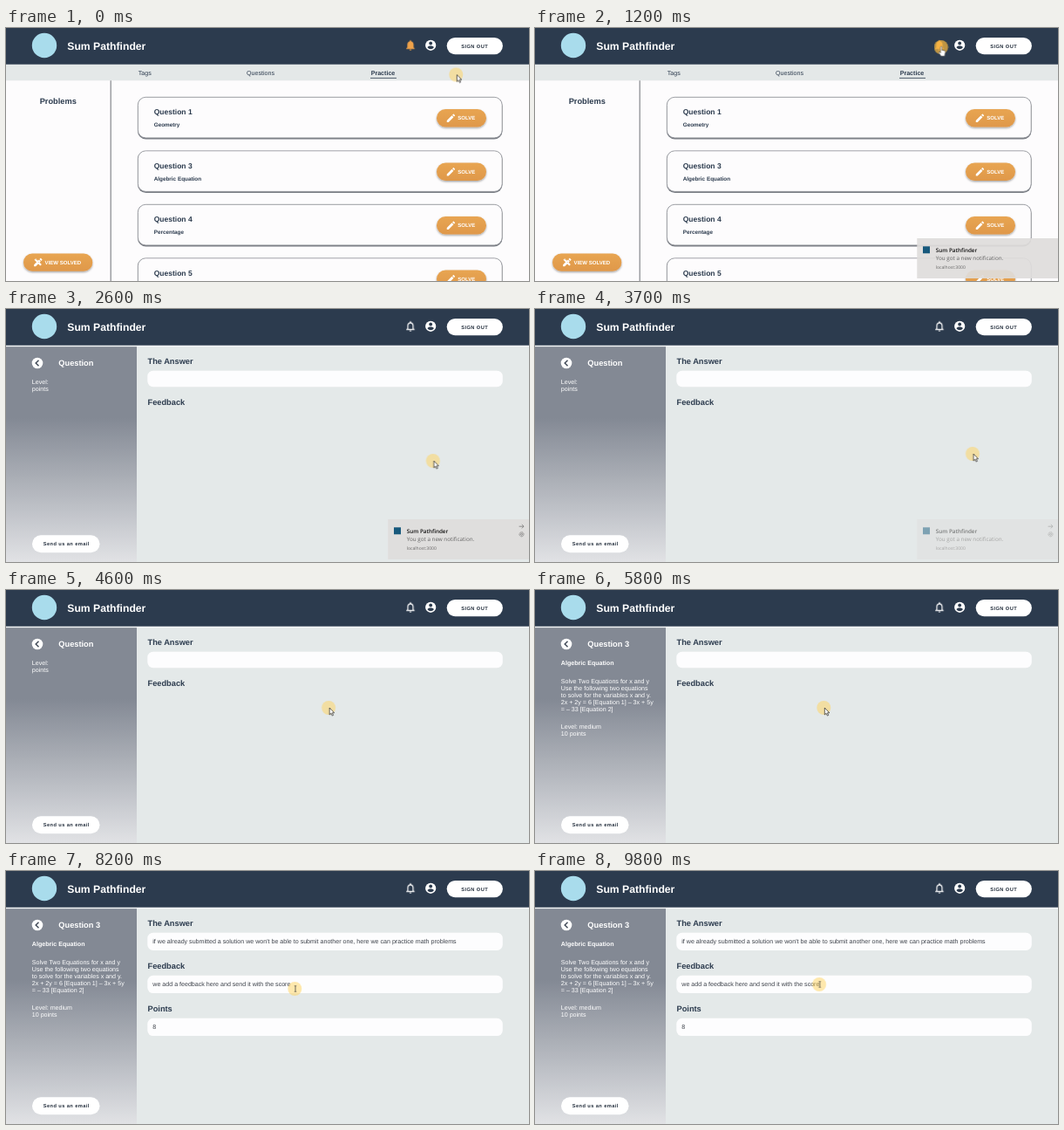
An HTML page that plays this animation: 600 px wide and 290 px high, repeating every 9900 ms.

```html
<!DOCTYPE html>
<html lang="en">
<head>
<meta charset="utf-8">
<title>Practice notifications</title>
<style>
  html, body { margin: 0; width: 100%; height: 100%; overflow: hidden; background: #fdfcfd; }
  svg { display: block; width: 600px; height: 290px; }
  text { font: 7.1px "Liberation Sans", Arial, sans-serif; fill: #2c3b4e; text-rendering: geometricPrecision; }
  .bold { font-weight: 700; }
  .brand { font-size: 12.2px; font-weight: 700; fill: #fff; }
  .heading { font-size: 9.25px; font-weight: 700; }
  .title { font-size: 8.5px; font-weight: 700; }
  .topic { font-size: 6.36px; font-weight: 700; }
  .label { font-size: 6.05px; font-weight: 700; fill: #fff; }
  .pill { font-size: 5.7px; font-weight: 700; letter-spacing: .41px; fill: #26313f; }
  .light text { fill: #fff; }
  .field text { fill: #3c4149; }
  .field rect { fill: #fdfdfe; }
  #toast text { font-family: "Open Sans", "Noto Sans", sans-serif; font-size: 6.3px; fill: #666; }
  #toast .app { font-weight: 600; fill: #111; }
  #toast .host { font-size: 5.05px; }

  /* One loop is 9.9 s, so 1% is 99 ms. */
  .t { animation: 9.9s step-end infinite; }
  .list { animation-name: list; }
  .detail { animation-name: detail; }
  .popup { animation-name: popup; }
  .tools { animation-name: tools; }
  .loading { animation-name: loading; }
  .loaded { animation-name: loaded; }
  .empty { animation-name: empty; }
  .answered { animation-name: answered; }
  .arrow { animation-name: arrow; }
  .hand { animation-name: hand; }
  .beam { animation-name: beam; }
  .press { animation-name: press; }
  @keyframes list { 0% { opacity: 1 } 26.26%, 100% { opacity: 0 } }
  @keyframes detail { 0% { opacity: 0 } 26.26%, 100% { opacity: 1 } }
  @keyframes popup { 0% { opacity: 0 } 14.14% { opacity: 1 } 26.26%, 100% { opacity: 0 } }
  @keyframes tools { 0% { opacity: 0 } 16.16%, 100% { opacity: 1 } }
  @keyframes loading { 0% { opacity: 1 } 58.58%, 100% { opacity: 0 } }
  @keyframes loaded { 0% { opacity: 0 } 58.58%, 100% { opacity: 1 } }
  @keyframes empty { 0% { opacity: 1 } 78.78%, 100% { opacity: 0 } }
  @keyframes answered { 0% { opacity: 0 } 78.78%, 100% { opacity: 1 } }
  @keyframes arrow { 0% { opacity: 1 } 7.07% { opacity: 0 } 17.17% { opacity: 1 } 78.78%, 100% { opacity: 0 } }
  @keyframes hand { 0% { opacity: 0 } 7.07% { opacity: 1 } 17.17%, 100% { opacity: 0 } }
  @keyframes beam { 0% { opacity: 0 } 78.78%, 100% { opacity: 1 } }
  @keyframes press { 0% { opacity: 0 } 12.12% { opacity: 1 } 14.14% { opacity: 0 } 24.24% { opacity: 1 } 26.26%, 100% { opacity: 0 } }

  #toast { animation: toast 9.9s linear infinite; }
  @keyframes toast {
    0%, 1% { transform: translateX(165px); opacity: 1; animation-timing-function: ease-out; }
    7% { transform: none; opacity: 1; }
    34.34% { transform: none; opacity: 1; }
    40.4%, 100% { transform: none; opacity: 0; }
  }
  #pointer { animation: pointer 9.9s ease-in-out infinite; }
  @keyframes pointer {
    0%, 1.01% { transform: translate(517px, 53.5px) }
    8.08%, 15.15% { transform: translate(466.5px, 22px) }
    23.2%, 26.25% { transform: translate(484px, 63px); animation-timing-function: step-end; }
    26.26% { transform: translate(490.5px, 174px); animation-timing-function: ease-out; }
    30.3%, 33.33% { transform: translate(495px, 181px) }
    43.43% { transform: translate(518px, 136px); animation-timing-function: linear; }
    46.46% { transform: translate(371px, 135px); animation-timing-function: ease-out; }
    50.5%, 84.84% { transform: translate(332px, 135px) }
    86.86%, 100% { transform: translate(326.7px, 130px) }
  }
</style>
</head>
<body>
<svg viewBox="0 0 600 290">
  <defs>
    <linearGradient id="orange" x2="0" y2="1">
      <stop stop-color="#e8a552"/><stop offset="1" stop-color="#df984a"/>
    </linearGradient>
    <linearGradient id="side" x2="0" y2="1">
      <stop offset=".33" stop-color="#838994"/><stop offset="1" stop-color="#e1e2e5"/>
    </linearGradient>
    <filter id="shadow" x="-10%" y="-20%" width="120%" height="160%">
      <feDropShadow dx="0" dy="1.2" stdDeviation=".8" flood-opacity=".38"/>
    </filter>
    <path id="pencil" d="M3 17.25V21h3.75L17.81 9.94l-3.75-3.75L3 17.25zM20.71 7.04c.39-.39.39-1.02 0-1.41l-2.34-2.34c-.39-.39-1.02-.39-1.41 0l-1.83 1.83 3.75 3.75 1.83-1.83z"/>
    <g id="card">
      <rect x="151" y="79.5" width="418.5" height="48" rx="9.5" fill="#777b82"/>
      <rect x="151.3" y="79.3" width="417.9" height="46.6" rx="9" fill="#fdfcfd" stroke="#8b8d93" stroke-width=".8"/>
      <rect x="494" y="93" width="57" height="20.5" rx="10.25" fill="url(#orange)" filter="url(#shadow)"/>
      <use href="#pencil" transform="translate(504.2 97) scale(.52)" fill="#fff"/>
      <text class="label" x="518.3" y="105.3">SOLVE</text>
    </g>
  </defs>

  <g class="t list">
    <rect width="600" height="290" fill="#fdfcfd"/>
    <rect y="41" width="600" height="19.3" fill="#e4e8e8"/>
    <text x="151.8" y="54.3">Tags</text>
    <text x="276" y="54.3">Questions</text>
    <text class="bold" x="418.7" y="54">Practice</text>
    <path d="M418 57.4H448" stroke="#2c3b4e" stroke-width=".8"/>
    <path d="M120.2 60.3V290" stroke="#85878c" stroke-width="1.2"/>
    <text class="heading" x="38.7" y="87.3">Problems</text>

    <use href="#card"/>
    <use href="#card" y="61.5"/>
    <use href="#card" y="123"/>
    <use href="#card" y="184.5"/>
    <text class="title" x="169.7" y="99.2">Question 1</text>
    <text class="topic" x="169.7" y="113.1">Geometry</text>
    <text class="title" x="169.7" y="160.7">Question 3</text>
    <text class="topic" x="169.7" y="174.6">Algebric Equation</text>
    <text class="title" x="169.7" y="222.2">Question 4</text>
    <text class="topic" x="169.7" y="236.1">Percentage</text>
    <text class="title" x="169.7" y="283.7">Question 5</text>

    <rect x="20" y="258.5" width="79.3" height="20.3" rx="10.15" fill="url(#orange)" filter="url(#shadow)"/>
    <use href="#pencil" transform="translate(30.6 262.3) scale(.52)" fill="#fff"/>
    <path d="M33.3 265l6.8 6.8" stroke="#fff" stroke-width="2.3"/>
    <path d="M34.7 265.2l-.8.8m3.8 2.2-.8.8" stroke="#e0994b" stroke-width=".6"/>
    <text class="label" x="44.6" y="270.8">VIEW SOLVED</text>
  </g>

  <g class="t detail">
    <rect y="41" width="600" height="249" fill="#e4e9e9"/>
    <rect y="41" width="600" height="2.2" fill="#f3f5f6"/>
    <rect y="43.2" width="150" height="246.8" fill="url(#side)"/>
    <circle cx="36" cy="62" r="6.3" fill="#fff"/>
    <path d="M37.5 58.8L34.2 62l3.3 3.2" fill="none" stroke="#444d5b" stroke-width="1.5"/>
    <g class="light">
      <g class="t loading">
        <text class="heading" x="60.3" y="65.2">Question</text>
        <text x="29.8" y="86.2">Level:</text>
        <text x="29.8" y="94.3">points</text>
      </g>
      <g class="t loaded">
        <text class="heading" x="60.3" y="65.2">Question 3</text>
        <text class="bold" x="29.8" y="86.3">Algebric Equation</text>
        <text x="29.8" y="106.7">Solve Two Equations for x and y</text>
        <text x="29.8" y="114.7">Use the following two equations</text>
        <text x="29.8" y="122.7">to solve for the variables x and y.</text>
        <text x="29.8" y="130.7">2x + 2y = 6 [Equation 1] – 3x + 5y</text>
        <text x="29.8" y="138.7">= – 33 [Equation 2]</text>
        <text x="29.8" y="158.9">Level: medium</text>
        <text x="29.8" y="166.9">10 points</text>
      </g>
    </g>
    <rect x="30" y="259.3" width="77.5" height="20" rx="10" fill="#fff"/>
    <text class="pill" x="42.8" y="271.4">Send us an email</text>

    <text class="heading" x="162.5" y="62.9">The Answer</text>
    <g class="t empty field">
      <rect x="162.3" y="70.7" width="407.5" height="18.5" rx="6.5"/>
      <text class="heading" x="162.5" y="109.8" style="fill:#2c3b4e">Feedback</text>
    </g>
    <g class="t answered">
      <text class="heading" x="162.5" y="111.7">Feedback</text>
      <text class="heading" x="162.5" y="160.6">Points</text>
      <g class="field">
        <rect x="162.3" y="70.7" width="407.5" height="20.3" rx="6.5"/>
        <rect x="162.3" y="119.8" width="407.5" height="20.3" rx="6.5"/>
        <rect x="162.3" y="168.8" width="407.5" height="20.3" rx="6.5"/>
        <text x="168.3" y="83.2">if we already submitted a solution we won't be able to submit another one, here we can practice math problems</text>
        <text x="168.3" y="132.2">we add a feedback here and send it with the score</text>
        <text x="168.3" y="181.4">8</text>
      </g>
    </g>
  </g>

  <rect width="600" height="41.7" fill="#2c3b4e"/>
  <circle cx="44" cy="20" r="14.2" fill="#a9dcec"/>
  <text class="brand" x="70.3" y="24.7">Sum Pathfinder</text>
  <g transform="translate(456.8 12.6) scale(.6)">
    <path class="t list" fill="#efa24a" d="M12 22c1.1 0 2-.9 2-2h-4c0 1.1.89 2 2 2zm6-6v-5c0-3.07-1.64-5.64-4.5-6.32V4c0-.83-.67-1.5-1.5-1.5s-1.5.67-1.5 1.5v.68C7.63 5.36 6 7.92 6 11v5l-2 2v1h16v-1l-2-2z"/>
    <path class="t detail" fill="#fff" fill-rule="evenodd" d="M12 22c1.1 0 2-.9 2-2h-4c0 1.1.89 2 2 2zm6-6v-5c0-3.07-1.64-5.64-4.5-6.32V4c0-.83-.67-1.5-1.5-1.5s-1.5.67-1.5 1.5v.68C7.63 5.36 6 7.92 6 11v5l-2 2v1h16v-1l-2-2zm-2 1H8v-6c0-2.48 1.51-4.5 4-4.5s4 2.02 4 4.5v6z"/>
  </g>
  <circle cx="487.2" cy="19.8" r="6.1" fill="#fff"/>
  <circle cx="487.2" cy="17.5" r="1.9" fill="#2c3b4e"/>
  <path d="M483.5 22.2c.3-2.4 7.1-2.4 7.4 0-1.5 2.6-5.9 2.6-7.4 0z" fill="#2c3b4e"/>
  <rect x="505.7" y="11" width="64.2" height="19.2" rx="9.6" fill="#fff"/>
  <text class="pill" x="522.3" y="22.7">SIGN OUT</text>

  <g class="t popup">
    <rect x="419.8" y="30" width="88.6" height="59.3" rx="2.5" fill="#fdfdfe" stroke="#d3d5d9" stroke-width=".7"/>
    <path d="M460.8 30.2l3.4-3.4 3.4 3.4" fill="#2c3b4e" stroke="#e8eaed" stroke-width=".8"/>
    <rect x="422.6" y="33.7" width="83.2" height="50" rx="2.5" fill="#fff" stroke="#4a5563" stroke-width=".9"/>
    <text class="bold" x="428.8" y="45.5">New Notification</text>
    <text x="428.8" y="56.5">You received a</text>
    <text x="428.8" y="64.6">feedback on your</text>
    <text x="428.8" y="72.6">solution.</text>
  </g>

  <g id="toast">
    <rect x="438.3" y="241" width="161.7" height="46" fill="#dfdddc" fill-opacity=".92"/>
    <rect x="445" y="250.3" width="8" height="8" fill="#17597c"/>
    <text class="app" x="459.8" y="256.8">Sum Pathfinder</text>
    <text x="459.8" y="266.1">You got a new notification.</text>
    <text class="host" x="459.8" y="275.7">localhost:3000</text>
    <g class="t tools" fill="none" stroke="#777" stroke-width=".8">
      <path d="M588.6 249.2h5.4m-2.2-2.2 2.2 2.2-2.2 2.2"/>
      <circle cx="591.5" cy="258.3" r="2.5" stroke-dasharray="1.3 .4"/>
      <circle cx="591.5" cy="258.3" r="1"/>
    </g>
  </g>

  <g id="pointer">
    <circle cx="-.7" r="8" fill="#ffd35c" fill-opacity=".5"/>
    <circle class="t press" cx="-.7" r="8" fill="#f5a72e" fill-opacity=".42"/>
    <path class="t arrow" d="M.3 0v8l1.8-1.7 1.3 2.8 1.3-.6-1.3-2.7h2.4z" fill="#fff" stroke="#222" stroke-width=".7"/>
    <path class="t hand" d="M-1.2 0c0-1.2 1.6-1.2 1.6 0v3.4l3 .7c.9.3 1 .8.8 1.7l-.7 4.4h-4.2l-2.4-3.6c-.5-.9.5-1.4 1.1-.8l.8.8z" fill="#fff" stroke="#333" stroke-width=".5"/>
    <path class="t beam" d="M-1.2-3.3h.8l.4.4.4-.4h.8M0-2.9v5.8m-1.2.4h.8l.4-.4.4.4h.8" fill="none" stroke="#333" stroke-width=".7"/>
  </g>
</svg>
</body>
</html>
```
